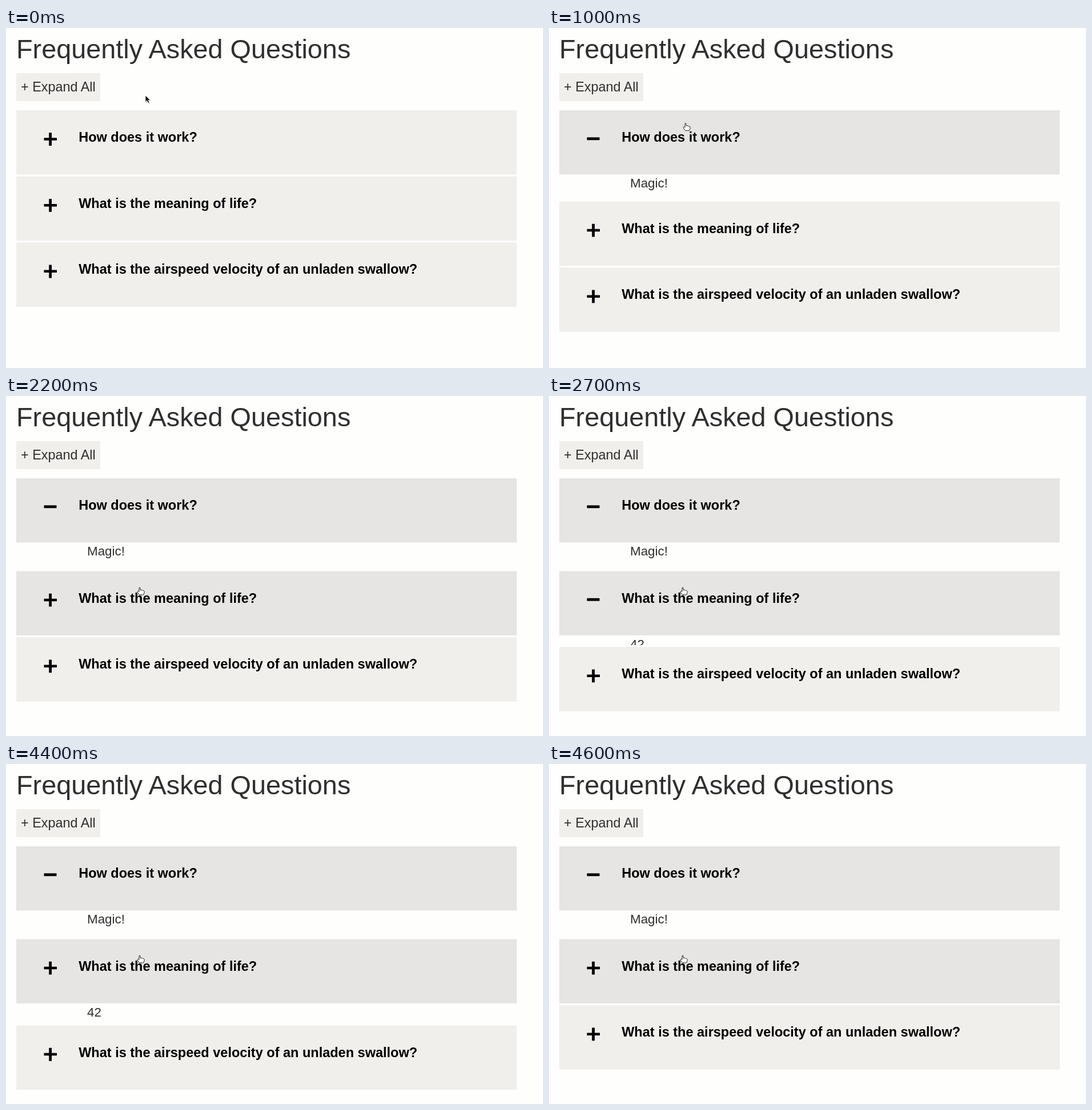
Animation, 940 px wide and 595 px high, one loop 5600 ms. Source, as an HTML page:

```html
<!DOCTYPE html>
<html lang="en">
<head>
<meta charset="utf-8">
<title>Frequently Asked Questions</title>
<style>
  html, body { margin: 0; width: 100%; height: 100%; overflow: hidden; background: #fefefd; }
  #stage { display: block; font-family: "Liberation Sans", Arial, sans-serif; fill: #2f2f2f; }
  .panel, .button { fill: #f0efec; }
  .panel.dark { fill: #e6e5e4; }
  .question { font-size: 23.5px; font-weight: bold; fill: #000; }
  .answer { font-size: 22.4px; }
  .icon { fill: #000; }
</style>
</head>
<body>
<svg id="stage" width="940" height="595" viewBox="0 0 940 595">
  <text x="18" y="53" font-size="46.8">Frequently Asked Questions</text>
  <rect class="button" x="18" y="79" width="147" height="49"/>
  <text x="26" y="111" font-size="23.4">+ Expand All</text>
  <g id="list"></g>
  <g id="arrow">
    <path d="M1 2V14L4 11.5L6 15.5L8.5 14.5L6.7 10.5H10.5Z" fill="#000" opacity=".15"/>
    <path d="M0 0V11.5L2.7 9L4.7 13.3L6.8 12.3L4.9 8.3H8.5Z" fill="#111" stroke="#fff" stroke-width=".7"/>
  </g>
  <path id="hand" fill="#fff" stroke="#222" stroke-width="1" stroke-linejoin="round"
    d="M-1 8V1.2Q0 -.5 1 1.2V5Q2.3 4.2 3 5.4Q4.6 4.7 5.4 6Q7.2 5.4 8 7.2V9.8L6.6 13.4H-.6L-4 8.4Q-4 6.6 -2.4 7Z"/>
</svg>
<script>
const LOOP = 5600, SLIDE = 250, ANSWER_HEIGHT = 46.8;
const TOP = 144, PITCH = 115.7, PANEL_HEIGHT = 112.45;

// Moments at which the screen is refreshed
const TICKS = [0, 400, 600, 800, 900, 1000, 1200, 1800, 1900, 2100, 2200,
  2700, 2800, 2900, 4400, 4500, 4600];

const POINTER = [
  [0, 'arrow', 244, 118], [400, 'arrow', 241, 141], [600, 'hand', 239, 166],
  [1800, 'arrow', 237.5, 218], [1900, 'arrow', 236, 307],
  [2100, 'hand', 235, 327], [2200, 'hand', 234, 334.5]
];

const ITEMS = [
  { question: 'How does it work?', answer: 'Magic!', hover: 400, open: 790, close: Infinity },
  { question: 'What is the meaning of life?', answer: '42', hover: 1900, open: 2597, close: 4318 },
  { question: 'What is the airspeed velocity of an unladen swallow?', answer: '',
    hover: Infinity, open: Infinity, close: Infinity }
];

const byId = id => document.getElementById(id);
const list = byId('list');
list.innerHTML = ITEMS.map(({ question, answer }) => `
  <g>
    <rect class="panel" x="18" width="876" height="${PANEL_HEIGHT}"/>
    <path class="icon"/>
    <text class="question" x="127.2" y="55">${question}</text>
    <svg class="clip" y="${PANEL_HEIGHT}" width="940" height="0" overflow="hidden">
      <text class="answer" x="142" y="23">${answer}</text>
    </svg>
  </g>`).join('');
const rows = [...list.children];

const PLUS = 'M66.5 48.2H75.2V39.2H80V48.2H89V52.7H80V62H75.2V52.7H66.5Z';
const MINUS = 'M66.5 47.3H88.5V52.2H66.5Z';

function swing(elapsed) {
  const p = Math.min(1, Math.max(0, elapsed / SLIDE));
  return (1 - Math.cos(Math.PI * p)) / 2;
}

function draw(now) {
  let y = TOP;
  ITEMS.forEach((item, i) => {
    const row = rows[i];
    const height = ANSWER_HEIGHT * (swing(now - item.open) - swing(now - item.close));
    const isOpen = now >= item.open && now < item.close;
    row.setAttribute('transform', `translate(0 ${y})`);
    row.querySelector('.panel').classList.toggle('dark', now >= item.hover);
    row.querySelector('.icon').setAttribute('d', isOpen ? MINUS : PLUS);
    row.querySelector('.clip').setAttribute('height', height);
    y += PITCH + height;
  });

  const [, shape, px, py] = POINTER.findLast(([time]) => time <= now);
  for (const id of ['arrow', 'hand']) {
    byId(id).setAttribute('visibility', id === shape ? 'visible' : 'hidden');
    byId(id).setAttribute('transform', `translate(${px} ${py})`);
  }
}

const start = performance.now();
function frame() {
  const time = (performance.now() - start) % LOOP;
  draw(TICKS.findLast(tick => tick <= time));
  requestAnimationFrame(frame);
}
frame();
</script>
</body>
</html>
```
